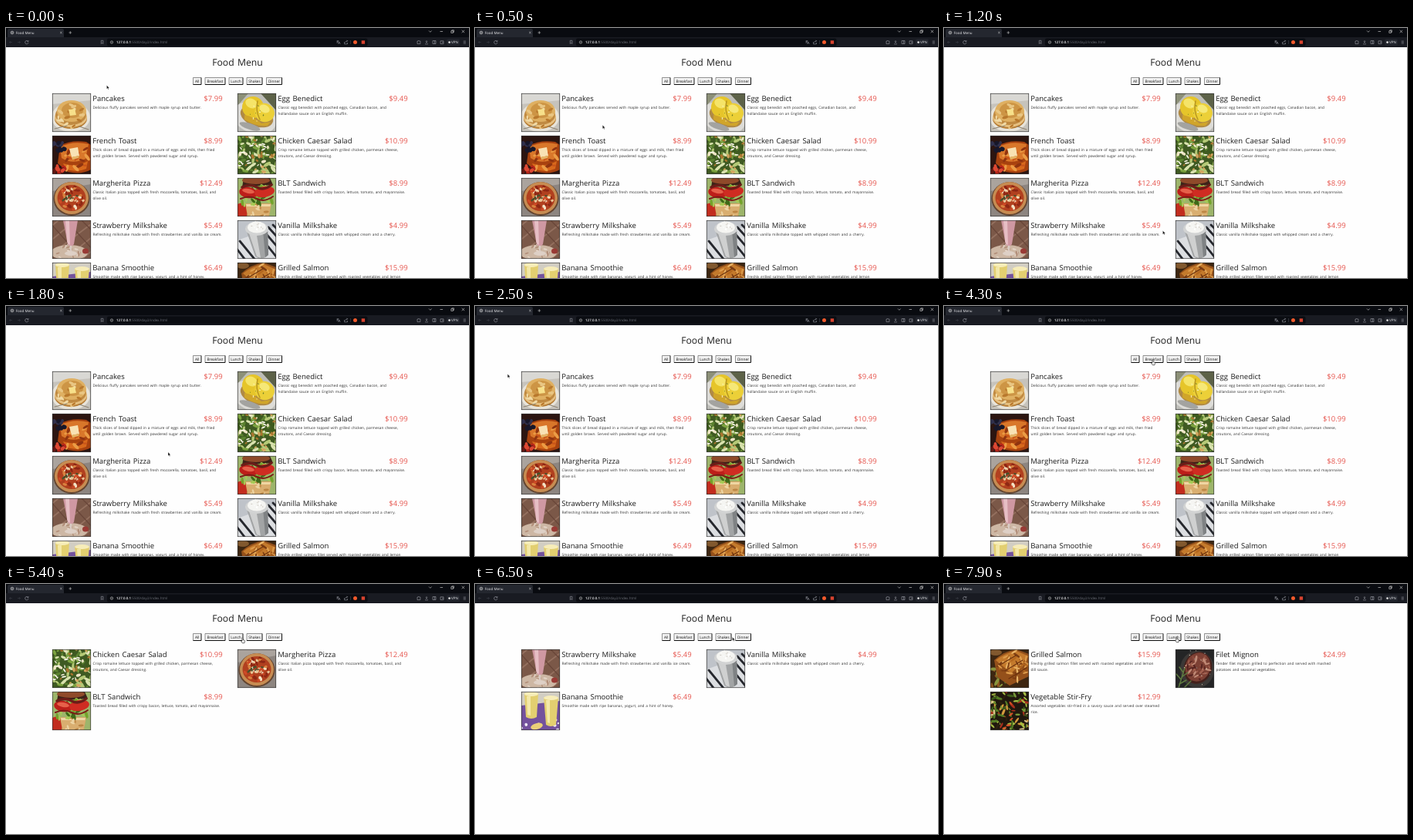
Animation of 600 by 325 pixels, one loop 8000 ms. Source, as an HTML page:

```html
<!DOCTYPE html>
<html lang="en">
<head>
<meta charset="utf-8">
<title>Food Menu</title>
<style>
  html, body { margin: 0; width: 100%; height: 100%; overflow: hidden; background: #fff; }
  #stage { display: block; width: 600px; height: 325px; }
  text { font-family: "Open Sans", "Noto Sans", sans-serif; text-rendering: geometricPrecision; white-space: pre; }
  .head { font-size: 12.2px; fill: #1c1c1c; word-spacing: .1em; text-anchor: middle; }
  .name { font-size: 9.55px; fill: #1c1c1c; word-spacing: .1em; }
  .price { font-size: 9.5px; fill: #e6564f; text-anchor: end; }
  .desc { font-size: 4.75px; fill: #333; word-spacing: .12em; }
  .btn text { font-size: 4.8px; fill: #111; text-anchor: middle; }
  .btn rect { fill: #f1f1f1; }
  .ui { font-size: 4.5px; fill: #f0f0f3; }
  .icon { fill: none; stroke: #a0a2aa; stroke-width: .6; }
</style>
</head>
<body>
<svg id="stage" viewBox="0 0 600 325">
  <rect width="600" height="325" fill="#fefefe"/>
  <g id="chrome">
    <rect width="600" height="25" fill="#191b22"/>
    <rect width="600" height="12" fill="#090b10"/>
    <path d="M2 12V3q0-2 2-2H73q2 0 2 2V12Z" fill="#24272f"/>
    <rect x="131" y="13.5" width="337.5" height="10" rx="2" fill="#0b0d12"/>
    <g class="icon">
      <circle cx="8" cy="6" r="1.9" stroke="#ddd"/>
      <path d="M6.300 6H9.700M8 4.300V7.700" stroke="#ddd" stroke-width=".4"/>
      <path d="M70.200 4.800l2.400 2.400m0-2.400l-2.400 2.400M81.500 6h3.600M83.300 4.200v3.600" stroke="#ccc"/>
      <path d="M548 3.500l1.800 1.800 1.800-1.800M562.500 4.500h3.600M576.800 3.800h2.600v2.600h-2.600zM577.800 3.800v-1h2.600v2.600h-1M590.700 2.800l3.400 3.400m0-3.400l-3.400 3.400" stroke="#ddd"/>
      <path d="M8 18.500H4.500m1.500-1.500l-1.500 1.500 1.500 1.500M15 18.500H18.500m-1.500-1.500l1.500 1.500-1.500 1.500" stroke="#3b3e47"/>
      <path d="M28.700 17.400a2.200 2.200 0 1 0 .3 1.800M29 16v1.700h-1.700M123.300 16.300h2.600v4.200l-1.300-1.100-1.300 1.100z"/>
      <circle cx="137" cy="18.500" r="1.700" stroke="#ccc"/>
      <path d="M137 18.200v1.100M137 17.300v.3" stroke="#ccc"/>
      <path d="M428.500 17h3M430 16v1c0 1-.7 2-1.600 2.300M429 17.600c.5 1 1 1.500 1.700 1.800M430.500 21l1.300-3 1.300 3M438.500 18v2.800h4V19M440 19c0-1.500 1-2.200 2.600-2.200m-1-1l1 1-1 1"/>
      <path d="M446.500 16v5" stroke="#444751"/>
      <path d="M533 17h1.200q.6-1.600 1.400 0h1.300v3.600H533zM545 16v3m-1.200-1.200l1.200 1.200 1.200-1.200M543 20.800h4M553 16.500h4v4h-4zM555.400 16.500v4M563 16.800h4v3.800h-4zM565 18.700h2"/>
      <path d="M592.700 17h3.200M592.700 18.600h3.200M592.700 20.200h3.200" stroke-width=".5"/>
    </g>
    <circle cx="452.500" cy="18.500" r="2.500" fill="#f25a2c"/>
    <rect x="460.700" y="16.300" width="4.400" height="4.400" fill="#d9432f"/>
    <rect x="571" y="14.300" width="17" height="8.500" rx="2" fill="#22252d"/>
    <circle cx="574.600" cy="18.600" r="1.400" fill="#ddd"/>
    <text class="ui" x="12.800" y="7.700">Food Menu</text>
    <text class="ui" x="143" y="20.200"><tspan font-weight="600">127.0.0.1</tspan><tspan fill="#6d7079">:5500/day2/index.html</tspan></text>
    <text class="ui" x="577" y="20.200">VPN</text>
  </g>
  <text class="head" x="300" y="49.400">Food Menu</text>
  <g id="buttons"></g>
  <g id="cards"></g>
  <g id="cursor">
    <path id="arrow" d="M0 0V4.800L1.100 3.800 1.900 5.500 2.700 5.100 1.900 3.500H3.400Z" fill="#111" stroke="#fff" stroke-width=".3"/>
    <path id="hand" d="M-.6 .5Q0-.3.600.5V2.700L2.700 3.200Q3.200 3.500 3 4.300L2.500 6.700H-.3L-1.800 4.500Q-1.700 3.500-.6 4.200Z" fill="#fff" stroke="#111" stroke-width=".6"/>
  </g>
</svg>
<script>
const $ = id => document.getElementById(id);

// Drawing helpers for the 50 x 50 dish pictures
const fill = c => `<rect width="50" height="50" fill="${c}"/>`;
const oval = (x, y, rx, ry, c, turn = 0) =>
  `<ellipse cx="${x}" cy="${y}" rx="${rx}" ry="${ry}" fill="${c}" transform="rotate(${turn} ${x} ${y})"/>`;
const shape = (d, c) => `<path d="${d}" fill="${c}"/>`;
const line = (d, c, w) => `<path d="${d}" fill="none" stroke="${c}" stroke-width="${w}" stroke-linecap="round"/>`;

function scatter(seed, n, colors, long, wide, spread = 34, cx = 25, cy = 25) {
  const rnd = () => (seed = (seed * 16807) % 2147483647) / 2147483647;
  let out = "";
  for (let i = 0; i < n; i++) {
    const a = rnd() * 6.283, r = Math.sqrt(rnd()) * spread, k = .6 + rnd() * .6;
    out += oval((cx + Math.cos(a) * r).toFixed(1), (cy + Math.sin(a) * r).toFixed(1),
      (long * k).toFixed(1), (wide * k).toFixed(1), colors[i % colors.length], Math.round(rnd() * 180));
  }
  return out;
}

const art = {
  pancakes: () => fill("#c6c3bc") + shape("M0 0H50V9L0 14Z", "#d9d8d4") + oval(24, 31, 25, 19, "#e8e4da") +
    oval(24, 33, 21, 13, "#b67c33") + oval(24, 31, 21, 13, "#e6c081") + oval(24, 28, 20, 13, "#c08a42") +
    oval(25, 23, 19, 14, "#dfb062") + oval(26, 22, 14, 10, "#cd9545") +
    scatter(13, 16, ["#e9c684", "#b9792d", "#f0d9a4"], 3.5, 1.6, 17, 24, 28) +
    shape("M21 21L29 20 31 28 23 29Z", "#f7e08a") + line("M3 46L19 42M35 43L47 47", "#8f8370", 1.2),
  benedict: () => fill("#bdbdb8") + shape("M30 0H50V22Z", "#5d6248") + shape("M0 0H14L0 16Z", "#8c9078") +
    oval(22, 32, 29, 20, "#dddcd8", 20) + oval(25, 30, 22, 13, "#b08a45", 20) +
    oval(20, 18, 14, 14, "#e6c52a", 25) + oval(35, 25, 13, 12, "#ecd038", 25) +
    oval(18, 13, 8, 6, "#f5e468", 25) + oval(35, 20, 7, 5, "#f6e877", 25) +
    shape("M9 28Q22 30 31 39L43 37 39 42Q24 44 9 34Z", "#d0a52a") + line("M26 10Q23 22 29 34", "#b8951f", 1.5) +
    scatter(8, 10, ["#667a26", "#fbf6d0"], 1, .6, 15, 26, 23) + oval(16, 43, 14, 4, "#a3a3a0", 18),
  toast: () => fill("#2c1511") + shape("M10 13Q24 5 44 8L50 12V44Q38 51 20 47L7 36Z", "#a8420f") +
    shape("M10 15Q26 6 47 11L43 30Q26 38 12 29Z", "#d9772a") + shape("M14 36Q30 42 46 33L44 43Q30 49 17 43Z", "#d8691c") +
    scatter(29, 18, ["#eb9c45", "#8f3410", "#c9551a"], 4.5, 1.8, 18, 29, 28) +
    shape("M22 17L33 15 35 26 25 28Z", "#f8e2b4") + shape("M25 28L35 26 34 29 26 31Z", "#e3b668") +
    scatter(31, 10, ["#17172a", "#30304c"], 3, 2.6, 9, 7, 14) + scatter(5, 8, ["#b92519", "#dc4833", "#611713"], 3.5, 2.5, 9, 8, 42),
  caesar: () => fill("#3f5a22") + scatter(77, 110, ["#7ba23f", "#b5c977", "#3c5a1c", "#d9e2ae", "#5b8230"], 4.5, 1.9) +
    scatter(19, 34, ["#d4a660", "#eee5c4", "#a9752f"], 2.8, 1.7, 31) + scatter(44, 24, ["#faf6e8"], 2.8, .9, 31),
  pizza: () => fill("#8d8580") + shape("M0 0H50V8L0 17Z", "#aaa39d") + oval(25, 27, 23.5, 22, "#63442f") +
    oval(25, 26, 22, 21, "#c78c52") + oval(25, 26, 18.5, 17, "#b1401f") +
    scatter(23, 32, ["#e9c596", "#d9823f", "#f3e2c4", "#8f2814"], 3, 1.8, 16, 25, 26) +
    scatter(9, 14, ["#cf4a26", "#8d2615"], 2.6, 1.5, 16, 25, 26) + scatter(61, 7, ["#49512a"], 2.4, 1.2, 11, 25, 26),
  blt: () => fill("#9db56b") + shape("M8 0H42L46 9 6 12Z", "#3d2318") + oval(24, 3, 18, 5, "#8f4a2a") +
    shape("M0 34Q9 30 15 37L12 50H0Z", "#c22c1e") + shape("M10 33H44L41 50H13Z", "#d3a564") +
    shape("M11 34H43L42 39H12Z", "#efd6a3") + scatter(14, 30, ["#73a42b", "#a6cb55", "#3f6a18"], 5, 2, 20, 26, 30) +
    shape("M11 37H43L40 50H14Z", "#d9ae70") + scatter(37, 12, ["#bd8745", "#ecd3a2"], 3, 1.2, 11, 27, 44) +
    oval(14, 19, 12, 7, "#bd1f1a", 10) + oval(35, 18, 13, 7, "#cf2c22", -10) + oval(14, 17, 8, 3, "#e6604a", 10) +
    line("M6 12Q16 7 25 12T44 9", "#6b1d18", 3.5) + line("M4 27Q15 22 25 27T46 24", "#7a1d17", 2),
  strawberry: () => fill("#7b5848") + line("M-4 10L20-10M-4 28L40-8M-4 46L54 2M12 54L56 18M34 54L56 36", "#94705f", 1.8) +
    line("M-4 2L40 52M14-4L56 42M34-4L56 18", "#694639", 1.4) +
    oval(22, 42, 24, 10, "#cdb7a4") + scatter(21, 26, ["#b3907b", "#e3d4c6"], 3, 1.2, 15, 22, 44) +
    shape("M14 0H33L28 31Q24 37 20 31Z", "#cf98a2") + shape("M17 0H22L23 32Q19 31 19 26Z", "#e6bec4") +
    line("M24 34V41", "#d9cbc4", 2.5) + oval(24, 43, 8, 3, "#ded0c6") + oval(43, 40, 4, 3.5, "#983a35"),
  vanilla: () => fill("#bfc3c9") + shape("M0 26L50 8V50H0Z", "#dcdee1") +
    line("M-4 33L12 54M3 27L25 54M34 14L58 42M40 9L58 29M30 22L54 52M46 6L58 18", "#25272d", 2.8) +
    shape("M10 9H39L40 45Q32 53 23 47Z", "#a2a4a5") + shape("M14 14H24L30 49 25 47Z", "#cfd0d0") +
    shape("M33 13L39 10 40 45 36 48Z", "#7f8284") + oval(25, 11, 15, 9, "#d2d3d3") + oval(25, 9, 12, 7.5, "#f5f5f2") +
    scatter(3, 14, ["#cfc9c2", "#fff"], 1.6, .7, 9, 25, 9),
  banana: () => fill("#73519d") + scatter(17, 34, ["#eee9f5"], 2, 1.8) + shape("M0 0H50V12L0 18Z", "#d2cec3") +
    ["M4 2H22L20 33Q13 37 6 33Z", "M29 7H48L45 43Q38 47 32 43Z"].map(d => shape(d, "#e3cf70")).join("") +
    shape("M7 6H12V31L8 30Z", "#f3e8a8") + shape("M32 11H37V41L34 40Z", "#f3e8a8") +
    oval(13, 3, 9, 3, "#f7edb9") + oval(38.5, 8, 9.5, 3, "#f7edb9") + oval(20, 45, 8, 4, "#ead078", -15),
  salmon: () => fill("#3d2611") + scatter(22, 18, ["#58712b", "#89943d", "#8d551f"], 5, 1.8, 15, 8, 39) +
    shape("M5 14Q18 2 34 0L50 6V35L25 47 9 36Z", "#94501a") + shape("M7 14Q20 4 34 2L50 9 27 31Z", "#c47a2c") +
    scatter(6, 42, ["#de9d4c", "#7b3c12", "#b5681f", "#e8b366"], 4.5, 1.2, 19, 30, 21) +
    line("M13 20L33 8M19 28L42 14M24 38L47 24", "#6b310d", 1.2) + oval(7, 4, 8, 4, "#81582e"),
  filet: () => fill("#242526") + oval(28, 26, 22, 24, "#3b3836") + oval(29, 24, 18, 21, "#43201b", 20) +
    oval(29, 23, 16, 19, "#7c4034", 20) +
    scatter(53, 44, ["#a3604f", "#572420", "#8c4a3c", "#c08a76"], 4, 1.3, 15, 29, 23) +
    line("M4 50L12 24M7 39L1 32M8 36L16 30M5 45L14 40M10 30L5 23M12 49L20 41", "#5f7a40", 1.5) +
    scatter(41, 14, ["#d8c8b0", "#8b8a86"], .8, .6, 24),
  stirfry: () => fill("#20180f") + scatter(91, 100, ["#547c24", "#a6bd43", "#a92f1c", "#2b200e", "#d39a3c", "#3c5a1a"], 4.5, 1.4) +
    scatter(15, 24, ["#d9c28a", "#77983a", "#d35127"], 3, 1.2)
};

const dishes = [
  ["Breakfast", "pancakes", "Pancakes", "7.99", "Delicious fluffy pancakes served with maple syrup and butter."],
  ["Breakfast", "benedict", "Egg Benedict", "9.49", "Classic egg benedict with poached eggs, Canadian bacon, and|hollandaise sauce on an English muffin."],
  ["Breakfast", "toast", "French Toast", "8.99", "Thick slices of bread dipped in a mixture of eggs and milk, then fried|until golden brown. Served with powdered sugar and syrup."],
  ["Lunch", "caesar", "Chicken Caesar Salad", "10.99", "Crisp romaine lettuce topped with grilled chicken, parmesan cheese,|croutons, and Caesar dressing."],
  ["Lunch", "pizza", "Margherita Pizza", "12.49", "Classic Italian pizza topped with fresh mozzarella, tomatoes, basil, and|olive oil."],
  ["Lunch", "blt", "BLT Sandwich", "8.99", "Toasted bread filled with crispy bacon, lettuce, tomato, and mayonnaise."],
  ["Shakes", "strawberry", "Strawberry Milkshake", "5.49", "Refreshing milkshake made with fresh strawberries and vanilla ice cream."],
  ["Shakes", "vanilla", "Vanilla Milkshake", "4.99", "Classic vanilla milkshake topped with whipped cream and a cherry."],
  ["Shakes", "banana", "Banana Smoothie", "6.49", "Smoothie made with ripe bananas, yogurt, and a hint of honey."],
  ["Dinner", "salmon", "Grilled Salmon", "15.99", "Freshly grilled salmon fillet served with roasted vegetables and lemon|dill sauce."],
  ["Dinner", "filet", "Filet Mignon", "24.99", "Tender filet mignon grilled to perfection and served with mashed|potatoes and seasonal vegetables."],
  ["Dinner", "stirfry", "Vegetable Stir-Fry", "12.99", "Assorted vegetables stir-fried in a savory sauce and served over steamed|rice."]
];

$("cards").innerHTML = dishes.map(([, pic, name, price, desc]) => `<g>
  <svg width="50" height="50" viewBox="0 0 50 50" overflow="hidden">${art[pic]()}</svg>
  <rect x=".25" y=".25" width="49.5" height="49.5" fill="none" stroke="#333" stroke-width=".7"/>
  <text class="name" x="52.2" y="10.2">${name}</text>
  <text class="price" x="220.6" y="10.2">$${price}</text>
  ${desc.split("|").map((s, i) => `<text class="desc" x="52.5" y="${20.2 + i * 7.6}">${s}</text>`).join("")}
</g>`).join("");
const cards = [...$("cards").children];

const buttons = [["All", 242.5, 253], ["Breakfast", 258, 284], ["Lunch", 289, 307], ["Shakes", 312, 332], ["Dinner", 337.5, 357.5]];
const top1 = 64.5, bottom1 = 73.5;
$("buttons").innerHTML = buttons.map(([label, l, r]) => `<g class="btn">
  <rect x="${l}" y="${top1}" width="${r - l}" height="${bottom1 - top1}"/>
  <path d="M${l} ${bottom1}V${top1}H${r}" fill="none" stroke="#666" stroke-width=".7"/>
  <path d="M${l} ${bottom1}H${r}V${top1}" fill="none" stroke="#111" stroke-width="1"/>
  <text x="${(l + r) / 2}" y="70.8">${label}</text></g>`).join("");

const filters = [[0, "All"], [4400, "Breakfast"], [5300, "Lunch"], [6100, "Shakes"], [6800, "Dinner"]];

// time, x, y of the pointer tip
const path = [
  [0, 130.5, 74.5], [400, 160, 120], [1200, 283.5, 263.5], [1800, 210, 190], [2500, 42.2, 88.5],
  [2700, 66, 86], [3600, 262, 74], [4300, 270.5, 70], [4500, 270.5, 70], [5100, 303, 70], [5200, 303, 70],
  [5400, 306.5, 70], [5900, 322, 70], [6200, 322, 70], [6500, 333.5, 69], [6800, 346, 69], [7000, 346, 69], [7900, 301.5, 69]
];

function pointerAt(t) {
  const i = path.findIndex(p => p[0] > t);
  if (i < 0) return path[path.length - 1].slice(1);
  const [t0, x0, y0] = path[i - 1], [t1, x1, y1] = path[i];
  const u = (t - t0) / (t1 - t0), k = u * u * (3 - 2 * u);
  return [x0 + (x1 - x0) * k, y0 + (y1 - y0) * k];
}

let shown = "";
function showFilter(kind) {
  if (kind === shown) return;
  shown = kind;
  let n = 0;
  cards.forEach((card, i) => {
    const on = kind === "All" || dishes[i][0] === kind;
    card.style.display = on ? "" : "none";
    if (on) {
      card.setAttribute("transform", `translate(${60 + n % 2 * 240} ${85 + (n >> 1) * 55})`);
      n++;
    }
  });
}

function draw() {
  const t = Math.floor(performance.now() % 8000 / 100) * 100;
  showFilter(filters.filter(f => f[0] <= t).pop()[1]);
  const [x, y] = pointerAt(t);
  const over = y >= top1 && y <= bottom1 && buttons.some(([, l, r]) => x >= l && x <= r);
  $("cursor").setAttribute("transform", `translate(${x.toFixed(2)} ${y.toFixed(2)})`);
  $("arrow").style.display = over ? "none" : "";
  $("hand").style.display = over ? "" : "none";
  requestAnimationFrame(draw);
}
draw();
</script>
</body>
</html>
```
